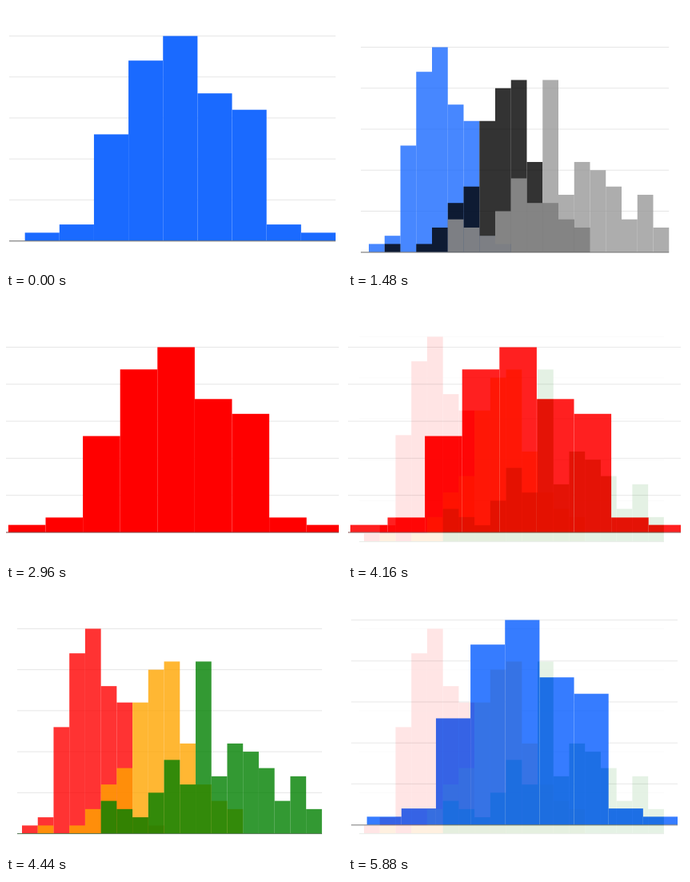
Write an HTML page with a canvas that moves like this. It is 420 px wide and 330 px high and loops after 5920 ms.

```html
<!DOCTYPE html>
<html lang="en">
<head>
<meta charset="utf-8">
<title>Histograms</title>
<style>
  html, body { margin: 0; width: 100%; height: 100%; overflow: hidden; background: #fff; }
  canvas { display: block; }
</style>
</head>
<body>
<canvas id="stage" width="420" height="330"></canvas>
<script>
const W = 420, H = 330, CLIP = 416;
const HOLD = 1200, STEP = 40, STEPS = 8;
const PART = HOLD + STEP * (STEPS - 1);

// Counts per bin, and the bin each group starts in
const groups = [
  { first: 0, counts: [1, 2, 13, 22, 25, 18, 16, 2, 1] },
  { first: 1, counts: [1, 0, 1, 3, 6, 8, 16, 20, 21, 11, 6, 4, 3] },
  { first: 5, counts: [4, 3, 2, 5, 9, 6, 21, 7, 11, 10, 8, 4, 7, 3] }
];

const charts = [
  { left: 4, right: 412, base: 293.6, top: 37.5, x: 23.65, bin: 43.15,
    alpha: 1, axis: '#666', axisY: 293.8, colors: ['#1a6aff'] },
  { left: 16, right: 401.2, base: 307.7, top: 51.5, x: 26, bin: 19.75,
    alpha: 0.8, axis: '#666', axisY: 307.9, colors: ['#1a6aff', '#000', '#999'] },
  { left: 0, right: CLIP, base: 292.9, top: 61.5, x: 2.9, bin: 46.6,
    alpha: 1, axis: '#7a3a3a', axisY: 293, colors: ['#f00'] },
  { left: 14, right: 395, base: 304.6, top: 48.4, x: 20, bin: 19.73,
    alpha: 0.8, axis: '#4f744f', axisY: 304.6, colors: ['#f00', '#ffa500', '#008000'] }
];

function render(c) {
  const layer = document.createElement('canvas');
  layer.width = W;
  layer.height = H;
  const g = layer.getContext('2d');
  const unit = (c.base - c.top) / 25;
  const rule = (y, color) => {
    g.fillStyle = color;
    g.fillRect(c.left, y - 0.5, c.right - c.left, 1);
  };

  g.fillStyle = '#fff';
  g.fillRect(0, 0, W, H);
  g.beginPath();
  g.rect(0, 0, CLIP, H);
  g.clip();

  for (let n = 5; n <= 25; n += 5) rule(c.base - n * unit, '#e6e6e6');

  g.globalAlpha = c.alpha;
  c.colors.forEach((color, i) => {
    g.fillStyle = color;
    groups[i].counts.forEach((n, j) => {
      const x = c.x + (groups[i].first + j) * c.bin;
      if (n) g.fillRect(x, c.base - n * unit, c.bin, n * unit);
    });
  });
  g.globalAlpha = 1;
  rule(c.axisY, c.axis);
  return layer;
}

const layers = charts.map(render);
const ctx = document.getElementById('stage').getContext('2d');
const start = performance.now();

function draw(now) {
  const t = Math.max(0, now - start) % (PART * layers.length);
  const i = Math.floor(t / PART);
  const local = t - i * PART;
  const mix = local < HOLD ? 0 : (Math.floor((local - HOLD) / STEP) + 1) / STEPS;

  ctx.globalAlpha = 1;
  ctx.drawImage(layers[i], 0, 0);
  if (mix) {
    ctx.globalAlpha = mix;
    ctx.drawImage(layers[(i + 1) % layers.length], 0, 0);
  }
  requestAnimationFrame(draw);
}
draw(start);
</script>
</body>
</html>
```
